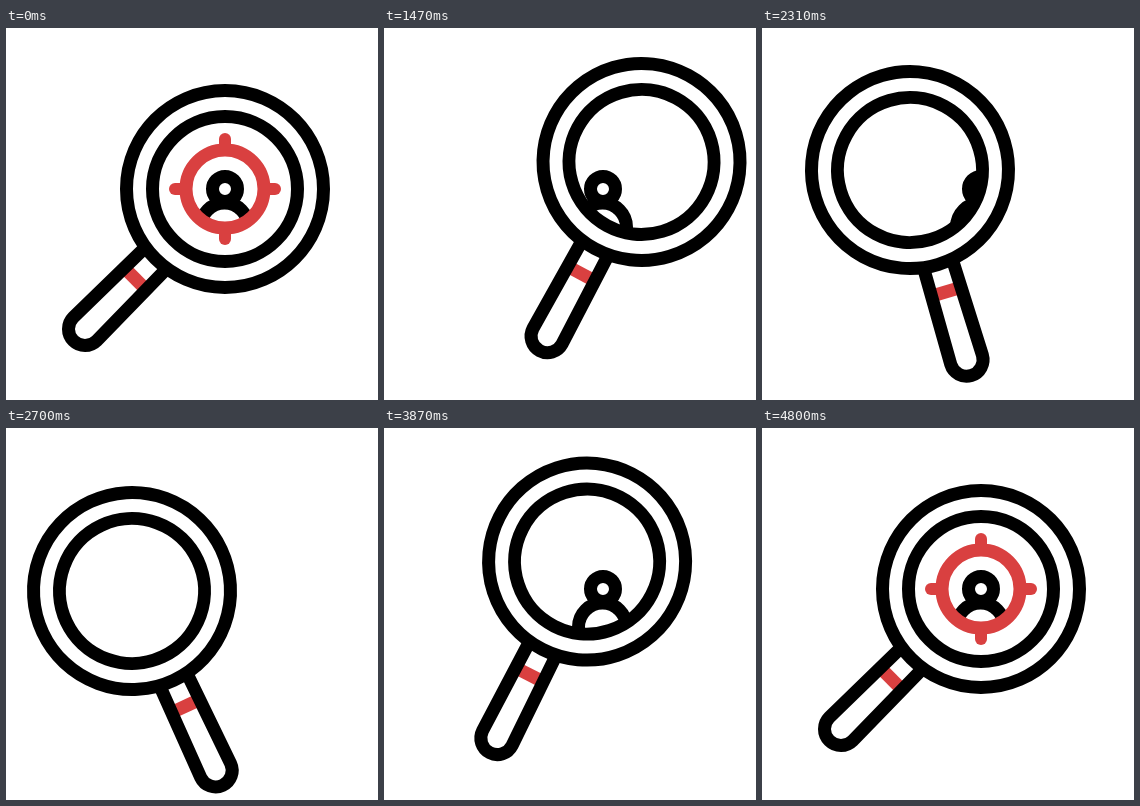
These frames come from a looping animation (372 by 372 pixels, 5.43 s). An HTML page with a canvas:

```html
<!DOCTYPE html>
<html lang="en">
<head>
<meta charset="utf-8">
<title>Search target</title>
<style>
html, body { margin: 0; width: 100%; height: 100%; overflow: hidden; background: #fff; }
canvas { display: block; width: 372px; height: 372px; }
</style>
</head>
<body>
<canvas id="stage" width="372" height="372"></canvas>
<script>
const ctx = document.getElementById('stage').getContext('2d');
const LOOP = 5430, RED = '#d94040', TAU = Math.PI * 2;
const HOME = { x: 219, y: 161 };

// Lens centre: [time, x, y]
const PATH = [
  [900, 219, 161], [1140, 232, 155], [1470, 257.5, 134], [1710, 247, 121],
  [1980, 197, 118], [2280, 151, 140], [2700, 126, 163], [3300, 126, 163],
  [3500, 140, 143], [3727, 179, 124], [3870, 203, 133.5], [4155, 219, 161]
];
const STOPS = [900, 2700, 3300, 4155];

// Eased progress from time a to time b
function ease(t, a, b) {
  const u = Math.min(1, Math.max(0, (t - a) / (b - a)));
  return u * u * (3 - 2 * u);
}

function slope(i, axis) {
  if (STOPS.includes(PATH[i][0])) return 0;
  const a = PATH[i - 1], b = PATH[i + 1];
  return (b[axis] - a[axis]) / (b[0] - a[0]);
}

// Cubic Hermite curve through the path points
function along(t, axis) {
  const last = PATH.length - 1;
  if (t <= PATH[0][0]) return PATH[0][axis];
  if (t >= PATH[last][0]) return PATH[last][axis];
  const i = PATH.findIndex(p => p[0] > t) - 1;
  const a = PATH[i], b = PATH[i + 1], span = b[0] - a[0];
  const u = (t - a[0]) / span, v = 1 - u;
  return v * v * (1 + 2 * u) * a[axis] + u * u * (3 - 2 * u) * b[axis] +
    span * u * v * (v * slope(i, axis) - u * slope(i + 1, axis));
}

function circle(x, y, r) {
  ctx.beginPath();
  ctx.arc(x, y, r, 0, TAU);
}

function ring(x, y, r) {
  circle(x, y, r);
  ctx.stroke();
}

function drawPerson(clipRadius) {
  ctx.save();
  circle(HOME.x, HOME.y, clipRadius);
  ctx.clip();
  ctx.beginPath();
  ctx.moveTo(194.5, 240);
  ctx.arc(218.5, 199, 24, Math.PI, 0);
  ctx.lineTo(242.5, 240);
  ctx.stroke();
  circle(HOME.x, HOME.y, 12.5);
  ctx.fillStyle = '#fff';
  ctx.fill();
  ctx.stroke();
  ctx.restore();
}

function drawReticle(r, angle) {
  ctx.save();
  ctx.translate(HOME.x, HOME.y);
  ctx.rotate(angle);
  ctx.strokeStyle = RED;
  ctx.lineCap = 'round';
  ring(0, 0, r);
  ctx.lineWidth = 12;
  for (let i = 0; i < 4; i++) {
    ctx.beginPath();
    ctx.moveTo(r, 0);
    ctx.lineTo(r + 11, 0);
    ctx.stroke();
    ctx.rotate(TAU / 4);
  }
  ctx.restore();
}

function drawGlass(x, y, angle) {
  ctx.save();
  ctx.translate(x, y);
  ctx.rotate(angle);
  ctx.fillStyle = RED;
  ctx.fillRect(-15, 120.5, 30, 13);
  ctx.beginPath();
  ctx.moveTo(15, 98);
  ctx.lineTo(16.5, 198);
  ctx.arc(0, 198, 16.5, 0, Math.PI);
  ctx.lineTo(-15, 98);
  ctx.stroke();
  ring(0, 0, 98.5);
  ring(0, 0, 72.5);
  ctx.restore();
}

function draw(t) {
  const x = along(t, 1), y = along(t, 2);
  const tilt = 45 - 70 * (ease(t, 900, 2700) - ease(t, 3300, 4155));
  const open = ease(t, 600, 900) - ease(t, 4200, 4800);
  const spin = ease(t, 0, 870) - ease(t, 4200, 4800);
  const r = 39 + 55 * open;
  const away = t > 900 && t < 4200;

  ctx.fillStyle = '#fff';
  ctx.fillRect(0, 0, 372, 372);
  ctx.strokeStyle = '#000';
  ctx.lineWidth = 13;

  ctx.save();
  circle(x, y, 72);
  ctx.clip();
  drawPerson(away ? 372 : r);
  if (!away) drawReticle(r, spin * TAU / 4);
  ctx.restore();

  drawGlass(x, y, tilt * Math.PI / 180);
}

function tick() {
  draw(performance.now() % LOOP);
  requestAnimationFrame(tick);
}
tick();
</script>
</body>
</html>
```
